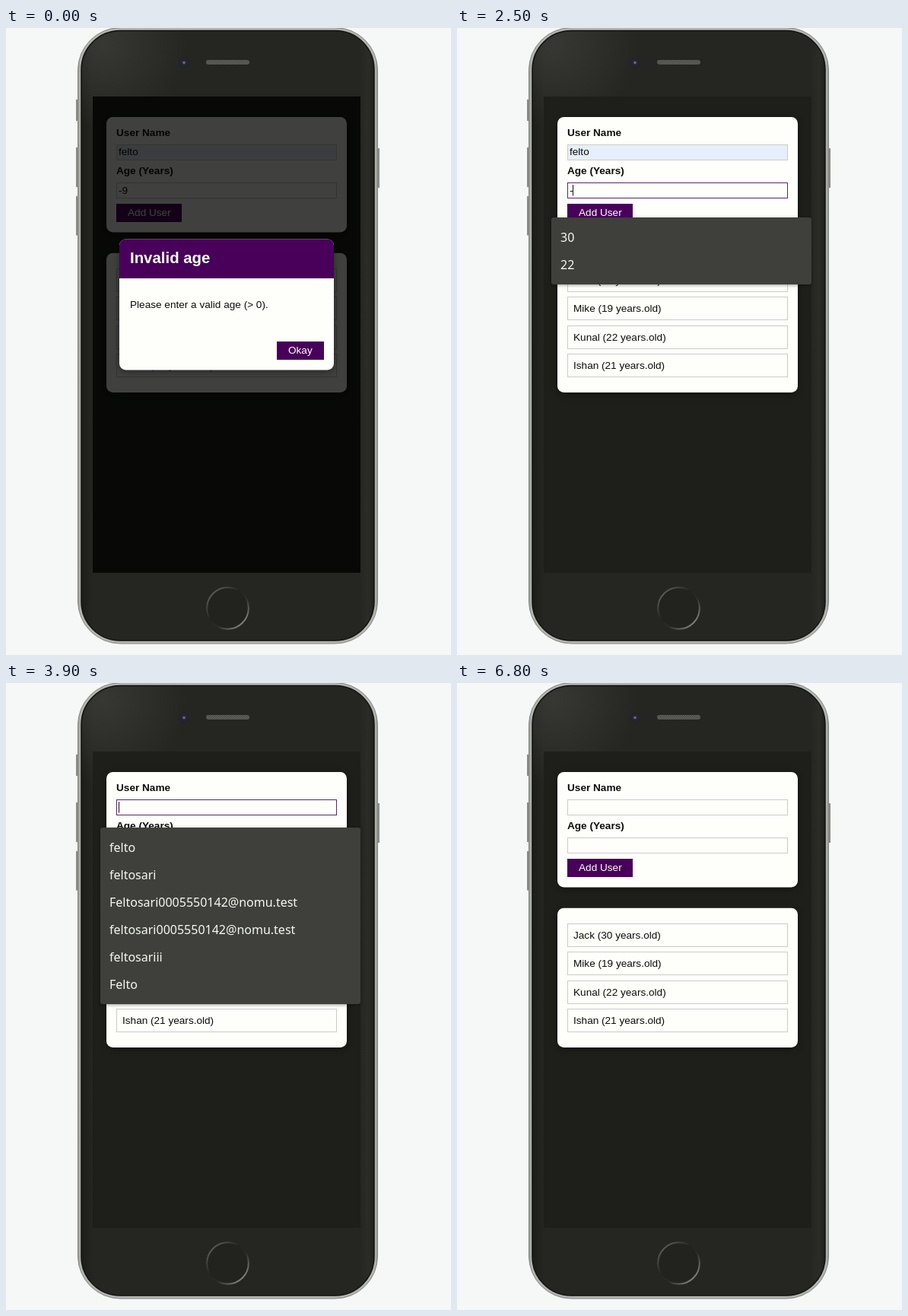
An HTML page for the animation above (8 s loop, 585 by 824 pixels).

```html
<!DOCTYPE html>
<html lang="en">
<head>
<meta charset="utf-8">
<title>User form</title>
<style>
  html, body { margin: 0; width: 100%; height: 100%; overflow: hidden; background: #f6f8f7; }
  svg { display: block; width: 585px; height: 824px; font: 13.6px "Liberation Sans", Arial, sans-serif; }
  text { white-space: pre; fill: #0c0d0a; }
  .bold { font-weight: 700; }
  .title { font-weight: 700; font-size: 20.4px; }
  .light { fill: #fefffa; }
  .card { fill: #fefffa; filter: drop-shadow(0 2px 4px rgba(0, 0, 0, .4)); }
  .box { fill: #fefffa; stroke: #cbccc7; }
  .box.filled { fill: #e6effb; }
  .box.focus { fill: #fefffa; stroke: #5b2470; }
  .purple { fill: #48005a; }
  .popup rect { fill: #3f403b; filter: drop-shadow(0 1px 2px rgba(0, 0, 0, .4)); }
  .popup text { fill: #f6f7f2; font: 500 16px "Noto Sans", sans-serif; }
</style>
</head>
<body>
<svg viewBox="0 0 585 824">
  <defs>
    <linearGradient id="rim">
      <stop offset="0" stop-color="#92938e"/><stop offset=".008" stop-color="#b4b5b0"/>
      <stop offset=".992" stop-color="#b4b5b0"/><stop offset="1" stop-color="#92938e"/>
    </linearGradient>
    <linearGradient id="glass">
      <stop offset="0" stop-color="#1c1d18"/><stop offset=".04" stop-color="#252621"/>
      <stop offset=".95" stop-color="#252621"/><stop offset=".98" stop-color="#2b2c27"/>
      <stop offset="1" stop-color="#20211c"/>
    </linearGradient>
    <radialGradient id="gloss" gradientUnits="userSpaceOnUse" cx="128" cy="22" r="110">
      <stop offset="0" stop-color="#3a3b36" stop-opacity=".85"/>
      <stop offset="1" stop-color="#3a3b36" stop-opacity="0"/>
    </radialGradient>
    <linearGradient id="ring" x2="1" y2="1">
      <stop offset=".1" stop-color="#60615c"/><stop offset=".42" stop-color="#22231e"/>
      <stop offset=".6" stop-color="#2b2c27"/><stop offset=".9" stop-color="#8b8c87"/>
    </linearGradient>
    <pattern id="mesh" width="3" height="3" patternUnits="userSpaceOnUse">
      <rect width="3" height="3" fill="#5d5e59"/><path d="M0 3L3 0" stroke="#474843"/>
    </pattern>
  </defs>

  <!-- Phone -->
  <path d="M93.5 94v28M93.5 157v52M93.5 221v51.5M489.5 158v52" stroke="#8a8b86" stroke-width="3"/>
  <rect x="94.5" y="-.5" width="394" height="809.5" rx="56" fill="url(#rim)" stroke="#858681"/>
  <rect x="99" y="3.5" width="385" height="801.5" rx="51" fill="url(#glass)" stroke="#11120e" stroke-width="1.5"/>
  <rect x="100" y="4.5" width="383" height="799.5" rx="50" fill="url(#gloss)"/>
  <circle cx="234" cy="45.5" r="7" fill="#23232a"/>
  <circle cx="234" cy="45.5" r="3.5" fill="#2a2a40"/>
  <circle cx="234" cy="45.5" r="1.5" fill="#77788a"/>
  <rect x="263" y="42" width="57" height="6" rx="3" fill="url(#mesh)"/>
  <circle cx="291.5" cy="762.5" r="27.3" fill="#22231e" stroke="url(#ring)" stroke-width="2"/>
  <rect x="114" y="90" width="352" height="626" fill="#1e1f1a"/>

  <!-- Form -->
  <rect class="card" x="132" y="117" width="316" height="151.5" rx="8.5"/>
  <text class="bold" x="145" y="142">User Name</text>
  <rect id="nameBox" x="145.5" y="153.5" width="289" height="20"/>
  <text id="nameText" x="148" y="167"/>
  <text class="bold" x="145" y="192">Age (Years)</text>
  <rect id="ageBox" x="145.5" y="203.5" width="289" height="20"/>
  <text id="ageText" x="148" y="218"/>
  <rect class="purple" x="145" y="231" width="86" height="24"/>
  <text class="light" x="160" y="247">Add User</text>
  <path id="caret" stroke="#0c0d0a"/>

  <!-- User list -->
  <rect class="card" x="132" y="295.7" width="316" height="183.3" rx="8.5"/>
  <g id="list"></g>

  <!-- Autocomplete and dialog -->
  <g id="popup" class="popup"></g>
  <g id="dialog">
    <rect x="114" y="90" width="352" height="626" opacity=".75" fill="#000200"/>
    <rect id="panel" class="card" x="149" y="277.5" width="282" rx="8.5"/>
    <path class="purple" d="M149 329V286a8.5 8.5 0 0 1 8.5-8.5h265a8.5 8.5 0 0 1 8.5 8.5v43z"/>
    <text id="title" class="title light" x="163" y="309"/>
    <text id="line1" x="163" y="368"/>
    <text id="line2" x="163" y="383.3"/>
    <g id="okay">
      <rect class="purple" x="356" y="412" width="62" height="24"/>
      <text class="light" x="371" y="428">Okay</text>
    </g>
  </g>
</svg>
<script>
const el = id => document.getElementById(id);
const LOOP = 8000;
const NAME = "felto";

const agePopup = { y: 249, items: ["30", "22"] };
const namePopup = { y: 190, items: [
  "felto", "feltosari", "Feltosari0005550142@nomu.test",
  "feltosari0005550142@nomu.test", "feltosariii", "Felto"
] };
const badAge = { title: "Invalid age", lines: ["Please enter a valid age (> 0)."] };
const badInput = { title: "Invalid input",
  lines: ["please enter a valid name and age (non-", "empty values)."] };

const editName = length => ({ name: NAME.slice(0, length), age: "", focus: "name", popup: namePopup });

// Each entry is a start time and the complete form state from then on.
const timeline = [
  [0, { name: NAME, age: "-9", dialog: badAge }],
  [700, { name: NAME, age: "-9" }],
  [1700, { name: NAME, age: "-9", focus: "age" }],
  [2500, { name: NAME, age: "-", focus: "age", popup: agePopup }],
  [2700, { name: NAME, age: "", focus: "age", popup: agePopup }],
  [2800, { name: NAME, age: "", focus: "age" }],
  [3300, editName(4)],
  [3400, editName(3)],
  [3500, editName(2)],
  [3700, editName(1)],
  [3800, editName(0)],
  [4000, { ...editName(0), fade: .5 }],
  [4100, { name: "", age: "", focus: "name" }],
  [4900, { name: "", age: "", dialog: badInput }],
  [6800, { name: "", age: "" }]
];

const users = [["Jack", 30], ["Mike", 19], ["Kunal", 22], ["Ishan", 21]];
el("list").innerHTML = users.map(([name, age], i) => {
  const y = 316.5 + Math.round(i * 37.35);
  return `<rect class="box" x="145.5" y="${y}" width="289" height="30"/>
    <text x="153" y="${336 + i * 37.35}">${name} (${age} years.old)</text>`;
}).join("");

function drawField(id, value, focused, filled) {
  el(id + "Text").textContent = value;
  el(id + "Box").setAttribute("class", "box" + (filled ? " filled" : "") + (focused ? " focus" : ""));
}

function drawCaret(focus) {
  if (!focus) return el("caret").setAttribute("d", "");
  const text = el(focus + "Text");
  const width = text.textContent ? text.getComputedTextLength() : 0;
  const x = Math.floor(148 + width) + .5;
  el("caret").setAttribute("d", `M${x} ${focus === "name" ? 156 : 206}v14.5`);
}

function drawPopup(popup, opacity = 1) {
  el("popup").setAttribute("opacity", opacity);
  el("popup").innerHTML = !popup ? "" :
    `<rect x="124" y="${popup.y}" width="342" height="${popup.items.length * 36 + 16}" rx="3"/>` +
    popup.items.map((item, i) => `<text x="136" y="${popup.y + 32 + i * 36}">${item}</text>`).join("");
}

function drawDialog(dialog) {
  el("dialog").style.display = dialog ? "" : "none";
  if (!dialog) return;
  const [first, second = ""] = dialog.lines;
  const extra = second ? 15.5 : 0;
  el("title").textContent = dialog.title;
  el("line1").textContent = first;
  el("line2").textContent = second;
  el("panel").setAttribute("height", 172 + extra);
  el("okay").setAttribute("transform", `translate(0 ${extra})`);
}

let shown;
function frame() {
  const time = performance.now() % LOOP;
  const state = timeline.findLast(([start]) => start <= time)[1];
  if (state !== shown) {
    shown = state;
    drawField("name", state.name, state.focus === "name", state.name === NAME);
    drawField("age", state.age, state.focus === "age", false);
    drawCaret(state.focus);
    drawPopup(state.popup, state.fade);
    drawDialog(state.dialog);
  }
  requestAnimationFrame(frame);
}
frame();
</script>
</body>
</html>
```
